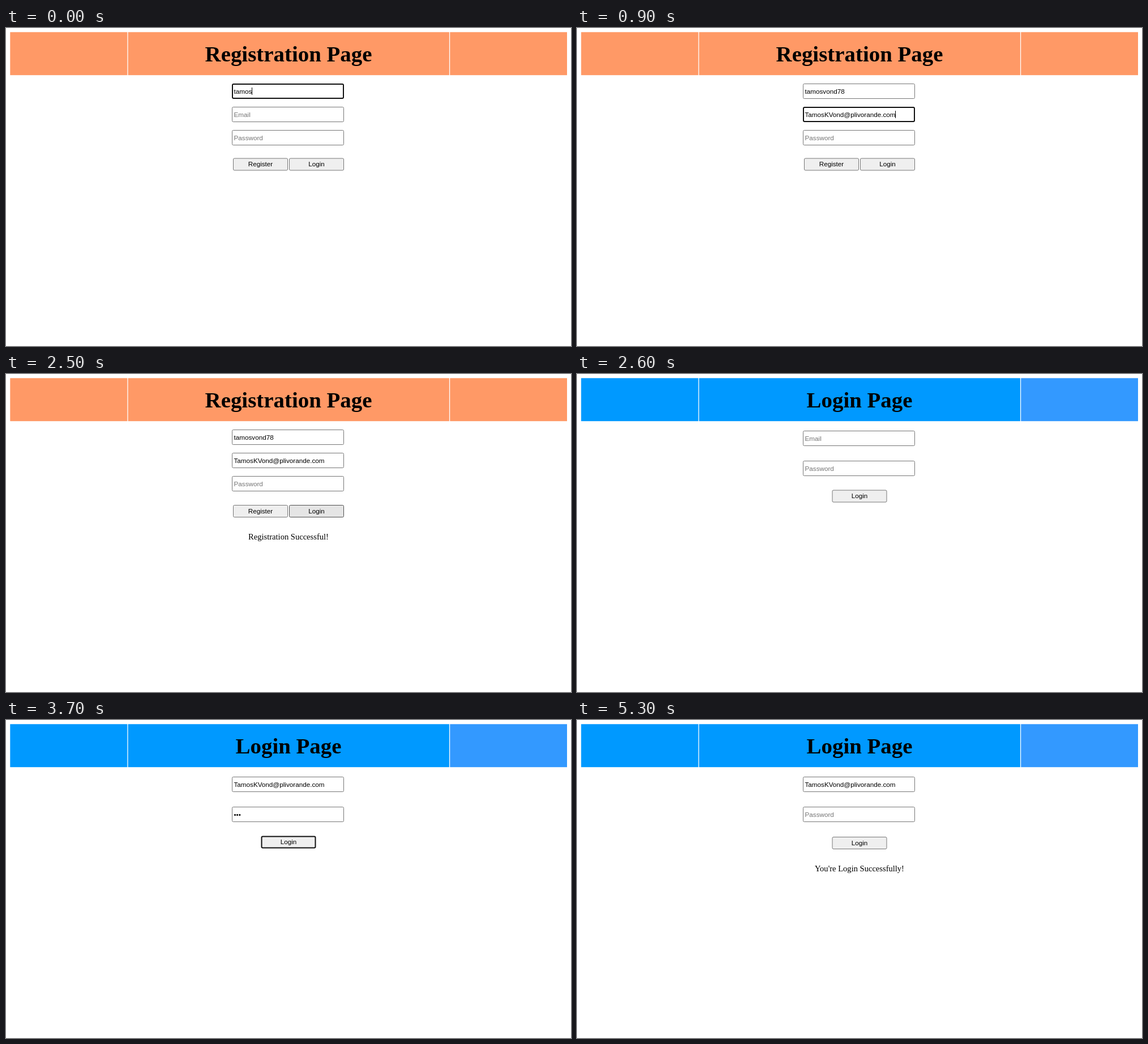
Animation, 998 px wide and 561 px high, one loop 5.4 s. Source, as an HTML page with a canvas:

```html
<!DOCTYPE html>
<html lang="en">
<head>
<meta charset="utf-8">
<title>Registration and login</title>
<style>
  html, body { margin: 0; width: 100%; height: 100%; overflow: hidden; background: #fff; }
  canvas { display: block; }
</style>
</head>
<body>
<canvas id="stage" width="998" height="561"></canvas>
<script>
const ctx = document.getElementById('stage').getContext('2d');
const LOOP = 5400;
const SANS = '11.7px "Liberation Sans", Arial, sans-serif';
const SERIF = '14.55px "Liberation Serif", "Times New Roman", serif';
const TITLE = 'bold 38.9px "Liberation Serif", "Times New Roman", serif';
const USER = 'tamosvond78';
const EMAIL = 'TamosKVond@plivorande.com';

// Each step changes only the listed values: user, email and pass are typed lengths.
const steps = [
  [0, { page: 'register', user: 5, email: 0, pass: 0, focus: 'user', hover: '', message: '' }],
  [100, { user: 7 }], [200, { user: 9 }], [300, { user: 11 }],
  [400, { focus: 'email' }],
  [500, { email: 5 }], [600, { email: 10 }], [700, { email: 17 }],
  [800, { email: 23 }], [900, { email: 25 }],
  [1000, { focus: 'pass' }],
  [1100, { pass: 1 }], [1200, { pass: 2 }], [1300, { pass: 4 }],
  [1400, { pass: 5 }], [1600, { pass: 7 }],
  [1700, { hover: 'Register' }],
  [2000, { focus: 'Register' }],
  [2100, { focus: '', hover: '', pass: 0, message: 'Registration Successful!' }],
  [2300, { hover: 'Login' }],
  [2600, { page: 'login', email: 0, hover: '', message: '' }],
  [2800, { focus: 'email' }],
  [3000, { email: 5 }], [3100, { email: 11 }], [3200, { email: 19 }], [3300, { email: 25 }],
  [3400, { focus: 'pass' }],
  [3500, { pass: 2 }], [3600, { pass: 3 }],
  [3700, { focus: 'Login' }],
  [3800, { focus: '', pass: 0, message: 'Incorrect Password!' }],
  [4100, { focus: 'pass' }],
  [4200, { pass: 1 }], [4300, { pass: 3 }], [4400, { pass: 4 }],
  [4500, { pass: 6 }], [4600, { pass: 7 }],
  [4800, { hover: 'Login' }],
  [4900, { focus: 'Login' }],
  [5000, { focus: '', hover: '', pass: 0, message: "You're Login Successfully!" }]
];

function stateAt(time) {
  return Object.assign({}, ...steps.filter(([start]) => start <= time).map(([, change]) => change));
}

function text(string, x, y, font, color = '#000', align = 'center') {
  ctx.font = font;
  ctx.fillStyle = color;
  ctx.textAlign = align;
  ctx.fillText(string, x, y);
}

function box(x, y, width, height, fill, focused, border = '#767676') {
  const line = focused ? 2 : 1;
  ctx.beginPath();
  ctx.roundRect(x + line / 2, y + line / 2, width - line, height - line, 2);
  ctx.fillStyle = fill;
  ctx.fill();
  ctx.lineWidth = line;
  ctx.strokeStyle = focused ? '#101010' : border;
  ctx.stroke();
}

function field(y, value, placeholder, focused) {
  const left = 402.5, baseline = y + 17.5;
  box(399, y, 198, 27, '#fff', focused);
  text(value || placeholder, left, baseline, SANS, value ? '#000' : '#757575', 'left');
  if (focused) {
    ctx.fillStyle = '#000';
    ctx.fillRect(Math.round(left + ctx.measureText(value).width), y + 7, 1, 13);
  }
}

function button(label, x, y, state) {
  const hovered = state.hover === label;
  box(x, y, 97, 22, hovered ? '#e5e5e5' : '#efefef', state.focus === label, hovered ? '#4f4f4f' : '#767676');
  text(label, x + 48.5, y + 14.7, SANS);
}

function header(title, color, rightColor) {
  ctx.fillStyle = color;
  ctx.fillRect(7.3, 7.3, 207, 75.9);
  ctx.fillRect(215.6, 7.3, 567.3, 75.9);
  ctx.fillStyle = rightColor;
  ctx.fillRect(784.2, 7.3, 206.8, 75.9);
  text(title, 499, 59, TITLE);
}

function draw(state) {
  const user = USER.slice(0, state.user);
  const email = EMAIL.slice(0, state.email);
  const dots = '•'.repeat(state.pass);
  const shift = state.message ? 1.5 : 0;
  ctx.fillStyle = '#fff';
  ctx.fillRect(0, 0, 998, 561);

  if (state.page === 'register') {
    header('Registration Page', '#ff9966', '#ff9966');
    field(98, user, 'Username', state.focus === 'user');
    field(139, email, 'Email', state.focus === 'email');
    field(180, dots, 'Password', state.focus === 'pass');
    button('Register', 401, 229.5 + shift, state);
    button('Login', 500, 229.5 + shift, state);
    text(state.message, 499, 292, SERIF);
  } else {
    header('Login Page', '#0099ff', '#3399ff');
    field(100, email, 'Email', state.focus === 'email');
    field(153, dots, 'Password', state.focus === 'pass');
    button('Login', 450.5, 204.5 + shift, state);
    text(state.message, 499, 267.3, SERIF);
  }
}

const startTime = performance.now();
function tick() {
  draw(stateAt((performance.now() - startTime) % LOOP));
  requestAnimationFrame(tick);
}
tick();
</script>
</body>
</html>
```
